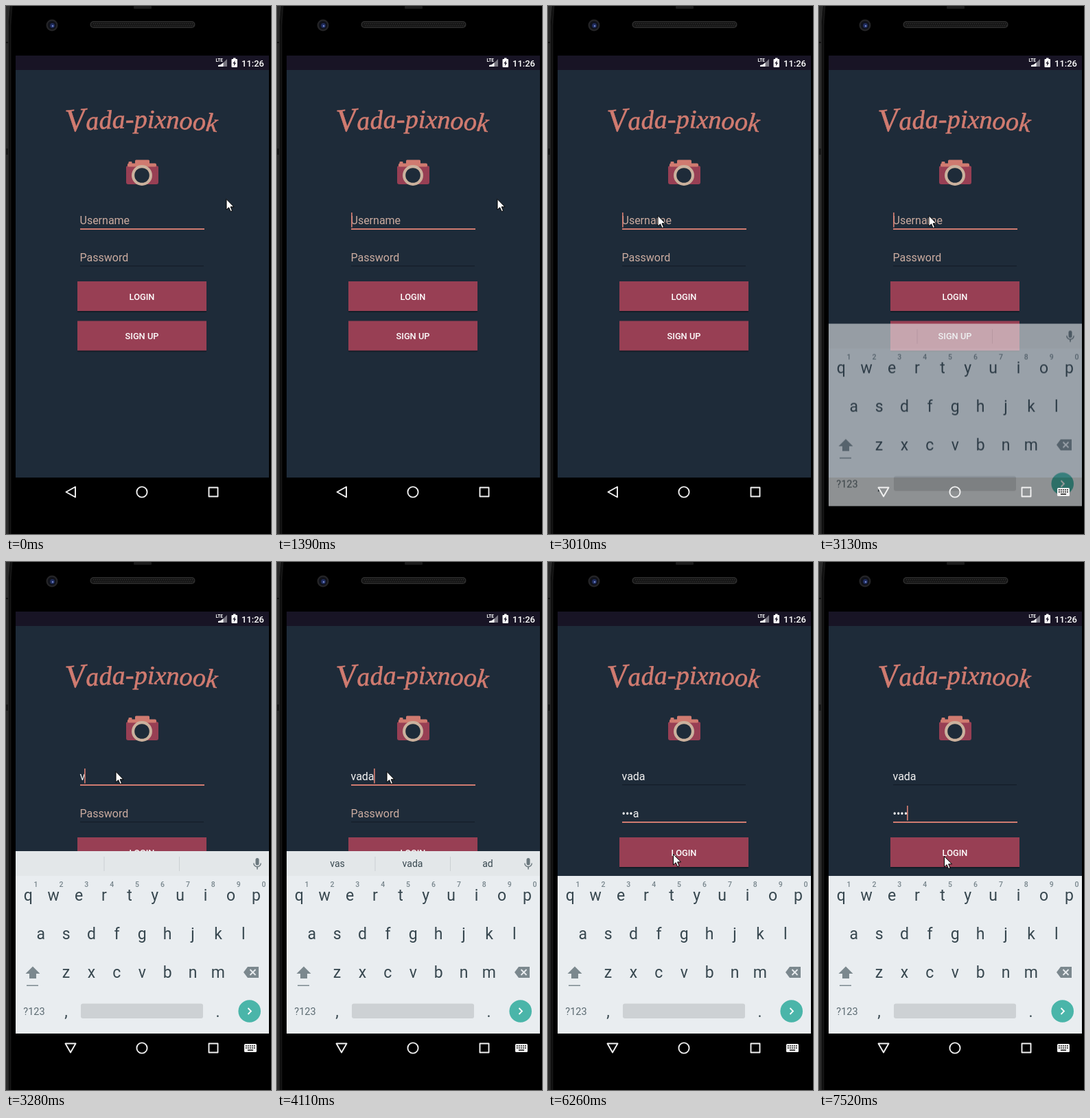
Write an HTML page with a canvas that moves like this. It is 386 px wide and 767 px high and loops after 8 s.

```html
<!DOCTYPE html>
<html lang="en">
<head>
<meta charset="utf-8">
<title>Login screen</title>
<style>
html, body { margin: 0; width: 100%; height: 100%; overflow: hidden; background: #000; }
canvas { display: block; width: 386px; height: 767px; }
</style>
</head>
<body>
<canvas id="stage"></canvas>
<script>
const W = 386, H = 767, LOOP = 8000;
const dpr = window.devicePixelRatio || 1;
const BG = '#1e2b39', CORAL = '#d07b70', WINE = '#983f54', HINT = '#cbaca0';
const KEY = '#37474f', ICON = '#7b888e';

function setup(canvas) {
  canvas.width = W * dpr;
  canvas.height = H * dpr;
  const c = canvas.getContext('2d');
  c.scale(dpr, dpr);
  return c;
}
const main = setup(document.getElementById('stage'));
const layer = document.createElement('canvas');
const keys = setup(layer);
let g = main;

// Timelines: the latest entry at or before t wins.
const at = (list, t) => list.reduce((v, e) => (e[0] <= t ? e[1] : v), list[0][1]);
const userLine = [[0, ''], [3280, 'v'], [3550, 'va'], [3830, 'vad'], [3980, 'vada']];
const passLine = [[0, ''], [4970, 'v'], [5090, '•a'], [5340, '••d'], [5490, '•••a'], [6990, '••••']];
const hints = [[0, ''], [3430, 's v c'], [3830, 'vs va as'], [4110, 'vas vada ad']];
const mouse = [[0, [320.5, 280]], [2340, [286, 288]], [2460, [204, 299]], [2580, [161, 303]],
  [2730, [159.5, 304]], [6110, [182, 416]], [6260, [182, 424]], [6410, [182, 427]]];
const blinks = [430, 860, 1390, 1790, 2220, 2730, 3010, 4850, 4970, 5960, 6560, 6990, 7520];
const FOCUS_PASS = 4420, KEYS_IN = 3130, KEYS_UP = 3280;

function rect(x, y, w, h, color, r = 0) {
  g.fillStyle = color;
  g.beginPath();
  if (r) g.roundRect(x, y, w, h, r); else g.rect(x, y, w, h);
  g.fill();
}
function disc(x, y, r, color) {
  g.fillStyle = color;
  g.beginPath();
  g.arc(x, y, r, 0, Math.PI * 2);
  g.fill();
}
function path(pts, close) {
  g.beginPath();
  for (let i = 0; i < pts.length; i += 2) g.lineTo(pts[i], pts[i + 1]);
  if (close) g.closePath();
}
function poly(pts, color) {
  path(pts, true);
  g.fillStyle = color;
  g.fill();
}
function line(pts, color, width, close) {
  path(pts, close);
  g.strokeStyle = color;
  g.lineWidth = width;
  g.stroke();
}
function text(s, x, y, size, color, align = 'left', weight = 400) {
  g.font = `${weight} ${size}px Roboto, sans-serif`;
  g.textAlign = align;
  g.fillStyle = color;
  g.fillText(s, x, y);
}

function phone() {
  rect(0, 0, W, H, '#000');
  poly([0, 0, 6, 0, 4, 24, 4, H, 0, H], '#2a2a2a');
  line([8, 0, 6, 28, 6, H], '#151515', 3);
  rect(0, 52, 3, 2, '#111');
  rect(0, 207, 3, 9, '#161616');
  rect(186, 0, 26, 4, '#1b1b1b', 1);
  disc(67, 28, 8.5, '#252527');
  disc(67, 28, 6.2, '#10121a');
  disc(67.5, 28.5, 3.4, '#1f2c5e');
  disc(68, 29, 1.3, '#7485c8');
  rect(122.5, 22, 153, 10, '#303030', 5);
  rect(123.8, 23.3, 150.4, 7.4, '#161616', 3.7);
  for (let x = 127; x < 272; x += 3) {
    rect(x, 25, 1.2, 1.2, '#333');
    rect(x + 1.5, 28, 1.2, 1.2, '#333');
  }
}

function statusBar() {
  rect(14, 72, 369, 21, '#181425');
  text('LTE', 305.5, 81, 6.4, '#fff', 'left', 700);
  poly([322, 77, 322, 88, 311, 88], '#777580');
  poly([316.5, 82, 316.5, 88, 309, 88, 309, 86, 313, 85], '#fff');
  rect(328.5, 77, 8.5, 12, '#fff', 1);
  rect(331, 75.5, 3.5, 2, '#fff');
  poly([333.8, 79, 330.3, 83.6, 332.4, 83.6, 331.8, 87.2, 335.2, 82.5, 333.1, 82.5], '#181425');
  text('11:26', 376, 87.5, 13, '#fff', 'right', 500);
}

// Letters sit on a shallow arch, tilted along it.
function title(s) {
  let x = 88;
  [...s].forEach((ch, i) => {
    g.font = `italic ${i ? 38 : 47.5}px "Liberation Serif", serif`;
    const w = g.measureText(ch).width, u = (x + w / 2 - 198) / 110;
    g.save();
    g.translate(x + w / 2, 177 + 6 * u * u);
    g.rotate(0.11 * u);
    g.textAlign = 'center';
    g.fillStyle = g.strokeStyle = CORAL;
    g.lineWidth = 0.6;
    g.fillText(ch, 0, 0);
    g.strokeText(ch, 0, 0);
    g.restore();
    x += w;
  });
}

function camera() {
  rect(175, 232, 47, 27, WINE, 3);
  rect(178.5, 226, 5, 5, CORAL, 1);
  rect(188, 223.5, 21, 10, CORAL, 1.5);
  rect(177, 228.5, 42, 5.5, CORAL, 2);
  rect(175, 233.5, 47, 8, WINE);
  disc(198, 246, 15, '#cbb19d');
  disc(198, 246, 10.8, BG);
}

function field(value, hint, y, focused, caret) {
  if (value) text(value, 107.5, y, 16, '#f3f3f3');
  else text(hint, 107.5, y, 16, HINT);
  if (focused) rect(108, y + 6, 181, 2, CORAL);
  else rect(108, y + 6, 180, 1.3, '#141e29');
  if (caret) {
    g.font = '400 16px Roboto, sans-serif';
    rect(Math.round(107.5 + g.measureText(value).width) - (value ? 1 : 0), y - 17, 1.7, 21.5, CORAL);
  }
}

function button(label, y) {
  rect(104, y + 2, 188, 43, 'rgba(8,14,22,.45)', 1);
  rect(104, y, 188, 43, WINE);
  text(label, 198, y + 26.5, 12.8, '#fff', 'center', 500);
}

function keyRow(s, x, y, size, color, weight) {
  [...s].forEach((ch, i) => text(ch, x + i * 36.9, y, size, color, 'center', weight));
}

function strip(words) {
  rect(14, 420, 369, 36, '#e3e7e9');
  rect(142.5, 428, 1, 21, '#cbd0d3');
  rect(252, 428, 1, 21, '#cbd0d3');
  words.split(' ').forEach((w, i) => text(w, 88 + i * 109.5, 443, 14, KEY, 'center'));
  rect(363.5, 430, 5, 10.5, '#6b787e', 2.5);
  g.strokeStyle = '#6b787e';
  g.lineWidth = 1.4;
  g.beginPath();
  g.arc(366, 437.5, 5.2, 0, Math.PI);
  g.stroke();
  rect(365.2, 442.5, 1.6, 4, '#6b787e');
}

function keyboard(t) {
  g = keys;
  g.clearRect(0, 0, W, H);
  if (t < FOCUS_PASS) strip(at(hints, t));
  rect(14, 456, 369, 229, '#e9edf0');
  keyRow('1234567890', 43.5, 472, 10.5, '#77858c', 500);
  keyRow('qwertyuiop', 32.3, 491.5, 23, KEY);
  keyRow('asdfghjkl', 50.7, 548, 23, KEY);
  keyRow('zxcvbnm', 87.5, 604, 23, KEY);
  poly([39, 587.5, 49.5, 598, 44, 598, 44, 605, 34, 605, 34, 598, 28.5, 598], ICON);
  rect(30, 614.5, 17, 1.5, ICON);
  poly([346, 596, 352, 588, 368, 588, 368, 604, 352, 604], ICON);
  line([355.5, 592, 363.5, 600], '#e9edf0', 1.8);
  line([363.5, 592, 355.5, 600], '#e9edf0', 1.8);
  text('?123', 41, 657.5, 14.5, '#5c6b72', 'center');
  text(',', 87.5, 661, 23, KEY, 'center');
  text('.', 308.5, 661, 23, KEY, 'center');
  rect(109, 641.5, 178, 21.5, '#cdd1d4', 3);
  disc(354.7, 652.5, 16.3, '#4ab5a9');
  line([352.5, 648, 357, 652.5, 352.5, 657], '#fff', 1.8);
  g = main;
  const up = t >= KEYS_UP;
  g.save();
  g.globalAlpha = up ? 1 : 0.61;
  g.drawImage(layer, 0, up ? 0 : 41.5, W, H);
  g.restore();
}

function navIcons(open) {
  g.lineJoin = 'round';
  line(open ? [86.5, 699.5, 101.5, 699.5, 94, 712.5] : [87.5, 706, 101, 698.5, 101, 713.5], '#f2f2f2', 1.9, true);
  g.beginPath();
  g.arc(198, 706, 7.6, 0, Math.PI * 2);
  g.stroke();
  g.strokeRect(295.5, 699.5, 13, 13);
  if (!open) return;
  rect(347, 700, 18, 12, '#f2f2f2', 1.5);
  for (let i = 0; i < 5; i++) {
    rect(349 + i * 3, 702, 1.7, 1.7, '#222');
    rect(349 + i * 3, 705, 1.7, 1.7, '#222');
  }
  rect(352, 708.3, 8, 1.6, '#222');
}

function pointer([x, y]) {
  g.save();
  g.translate(x + 0.5, y + 0.5);
  g.lineJoin = 'miter';
  const arrow = [0, 0, 0, 15.5, 3.6, 12.2, 6.2, 18, 8.6, 17, 6.1, 11.3, 11, 11.3];
  poly(arrow, '#fff');
  line(arrow, '#000', 1, true);
  g.restore();
}

function draw(t) {
  const onPass = t >= FOCUS_PASS, open = t >= KEYS_IN;
  const caret = blinks.filter(b => b <= t).length % 2 === 1;
  phone();
  statusBar();
  rect(14, 93, 369, 592, BG);
  title('Vada-pixnook');
  camera();
  field(at(userLine, t), 'Username', 317, !onPass, caret && !onPass);
  field(at(passLine, t), 'Password', 371, onPass, caret && onPass);
  button('LOGIN', 400);
  button('SIGN UP', 457.5);
  if (open) keyboard(t);
  navIcons(open);
  pointer(at(mouse, t));
}

const start = performance.now();
function tick() {
  draw((performance.now() - start) % LOOP);
  requestAnimationFrame(tick);
}
tick();
</script>
</body>
</html>
```
